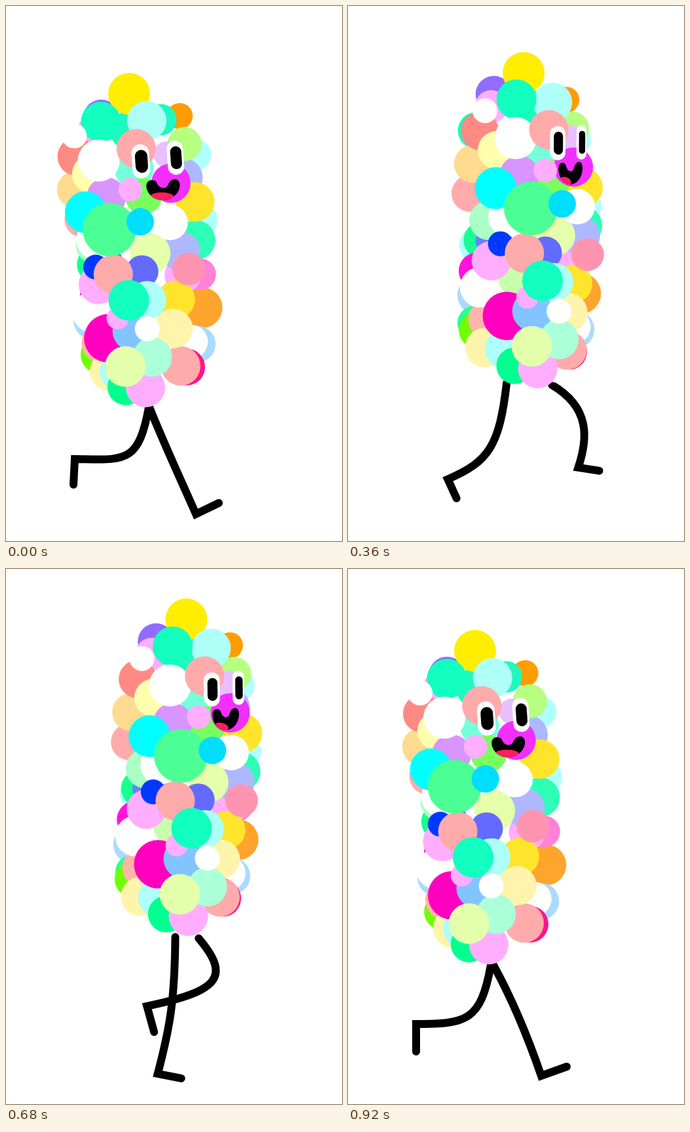
An HTML page with a canvas for the animation above (960 ms loop, 513 px wide and 816 px high).

```html
<!DOCTYPE html>
<html lang="en">
<head>
<meta charset="utf-8">
<title>Bubble walker</title>
<style>
  html, body { margin: 0; width: 100%; height: 100%; overflow: hidden; background: #fff; }
  canvas { display: block; }
</style>
</head>
<body>
<canvas id="stage" width="513" height="816"></canvas>
<script>
const ctx = document.getElementById('stage').getContext('2d');
const LOOP = 960, STEP = 40, HEIGHT = 448;

const WHITE = '#fff', YELLOW = '#ffe42c', TEAL = '#12ffbf', SALMON = '#ffabab', PINK = '#ffadff',
  ICE = '#adfff8', SKY = '#abdaff', CREAM = '#fff4ac', LIME = '#e5ffab', PERI = '#adb8ff',
  GREEN = '#00ff90', ORANGE = '#ffa42c';

// time, top x, top y, bottom x, bottom y, turn
const BODY = [
  [0, 188, 134, 213, 582, 0],
  [60, 187, 134, 216, 580, .05],
  [160, 201, 97, 235, 539, .26],
  [240, 225, 61, 258, 520, .5],
  [280, 240, 68, 270, 526, .63],
  [440, 293, 133, 306, 577, 1],
  [520, 302, 134, 308, 576, .99],
  [600, 300, 115, 300, 555, .86],
  [720, 261, 61, 266, 520, .5],
  [760, 246, 67, 250, 526, .38],
  [920, 194, 125, 215, 573, .01]
];

// time, hip, two curve handles, heel, toe
const LEG_A = [
  [0, 219, 612, 240, 665, 268, 725, 290, 775, 325, 758],
  [160, 224, 566, 228, 640, 234, 710, 241, 773, 282, 770],
  [280, 233, 552, 233, 640, 220, 690, 187, 754, 222, 769],
  [440, 254, 598, 237, 695, 220, 698, 131, 690, 125, 730],
  [600, 288, 585, 305, 650, 280, 662, 167, 662, 168, 702],
  [760, 288, 550, 360, 605, 355, 640, 263, 686, 285, 719],
  [920, 222, 604, 250, 655, 275, 715, 295, 773, 334, 759]
];
const LEG_B = [
  [0, 218, 612, 202, 700, 180, 692, 105, 691, 103, 730],
  [160, 260, 563, 305, 575, 300, 635, 186, 646, 197, 686],
  [280, 295, 550, 380, 565, 345, 610, 284, 650, 309, 683],
  [440, 318, 604, 345, 660, 370, 715, 393, 758, 430, 738],
  [600, 284, 580, 281, 650, 296, 715, 312, 780, 350, 768],
  [760, 235, 552, 238, 670, 210, 685, 155, 750, 185, 777],
  [920, 218, 604, 203, 690, 180, 694, 104, 694, 104, 736]
];

const lerp = (a, b, k) => a + (b - a) * k;

// Smooth looping interpolation through unevenly spaced keys
function pose(keys, t) {
  const n = keys.length;
  const key = i => keys[(i + n) % n];
  const time = i => key(i)[0] + Math.floor(i / n) * LOOP;
  let i = n - 1;
  while (keys[i][0] > t) i--;
  const span = time(i + 1) - time(i), k = (t - time(i)) / span;
  const slope = (j, c) => (key(j + 1)[c] - key(j - 1)[c]) / (time(j + 1) - time(j - 1)) * span;
  return keys[0].slice(1).map((_, c0) => {
    const c = c0 + 1, a = key(i)[c], b = key(i + 1)[c];
    const m = slope(i, c), e = slope(i + 1, c);
    return a + k * (m + k * (3 * (b - a) - 2 * m - e + k * (2 * (a - b) + m + e)));
  });
}

let body;

// Body coordinates to the stage; depth gives the sideways shift as the body turns
function place(x, y, depth) {
  const [tx, ty, bx, by, turn] = body, k = y / HEIGHT;
  return [lerp(tx, bx, k) + x + depth * (turn - .5), lerp(ty, by, k) + .12 * x * (turn - .5)];
}

function ball(color, x, y, depth, r = 30) {
  const [px, py] = place(x, y, depth);
  ctx.fillStyle = color;
  ctx.beginPath();
  ctx.arc(px, py, r, 0, Math.PI * 2);
  ctx.fill();
}

function drawBack() {
  ball('#b0ffff', 83, 98, -26, 24);
  ball(TEAL, -70, 90, -20, 28);
  ball(ORANGE, 80, 331, -26, 31);
  ball('#ff9d00', 68, 38, -14, 20);
  ball('#906cff', -46, 34, -3, 28);
  ball(PINK, -54, 53, 6, 25);
  ball('#22f7c0', 42, 42, -8, 24);
  ball('#22f7c0', 5, 56, 15);
  ball('#b0ffff', 89, 198, -18, 26);
  ball(PERI, 68, 132, -14);
  ball('#2effb6', 83, 228, -12);
  ball(YELLOW, 86, 170, -10);
  ball('#b0ffff', -72, 263, -36, 27);
  ball('#18ff90', -72, 256, -12, 28);
  ball('#6483ff', -55, 256, -8, 28);
  ball('#ff14dc', -77, 303, -26, 28);
  ball(SALMON, -87, 186, -12, 28);
  ball('#ff82d6', 79, 280, -28, 24);
  ball(PINK, 64, 280, -5, 28);
  ball(SKY, -82, 340, -16);
  ball('#2bff92', -80, 382, -40, 26);
  ball('#6fff00', -81, 393, -26, 28);
  ball('#ffb5a8', -69, 376, -11);
  ball(SKY, 70, 386, -25, 28);
  ball(WHITE, 64, 382, -18, 26);
  ball('#ff148a', 55, 420, -19, 28);
  ball(CREAM, -69, 419, -31);
  ball(ICE, -45, 420, -13);
  ball(GREEN, -33, 445, -6, 28);
  ball(WHITE, 28, 446, 0, 22);
}

function drawSides() {
  ball('#b6ff80', 74, 81, -12, 26);
  ball('#ffdb90', -86, 141, 6, 29);
  ball('#ff8a84', -77, 91, 17, 29);
  ball('#ffffae', -54, 119, 22, 29);
  ball('#75ffdb', 15, 115, 28);
  ball('#ffee00', 0, 0, 0, 32);
  ball('#abffc6', -64, 226, 0);
  ball(WHITE, -46, 220, 34);
  ball(WHITE, -79, 328, -9, 31);
  ball('#c8ffab', -24, 312, -5, 28);
  ball(PINK, -63, 287, 0);
  ball(SALMON, 50, 418, -11);
  ball(PINK, 0, 448, 0);
  ball(PERI, 71, 244, 12);
  ball(YELLOW, 58, 317, 8, 29);
  ball(CREAM, 49, 361, 4);
  ball('#ff94b1', 81, 272, 11, 25);
  ball('#ff00bf', -47, 370, 11, 37);
  ball('#82c4ff', -8, 361, 13, 31);
  ball('#e8bfff', 60, 96, 16, 20);
}

function drawFront() {
  ball(LIME, 29, 245, 21, 31);
  ball('#78ff5e', 28, 158, 30, 28);
  ball('#f22fff', 64, 140, 16);
  ball(WHITE, 64, 200, 25, 27);
  ball('#d894ff', -26, 156, 35);
  ball('#0038ff', -55, 261, 21, 19);
  ball('#636aff', 14, 272, 19, 25);
  ball(SALMON, -23, 274, 33);
  ball(ICE, 35, 43, 21);
  ball(TEAL, -26, 41, 39, 30.5);
  ball(WHITE, -72, 60, 30, 19);
  ball(WHITE, -31, 100, 42, 32);
  ball(SALMON, 23, 85, 34);
  ball('#00ffff', -61, 177, 30, 32);
  ball('#4cff95', -16, 206, 51, 41);
  ball(PINK, 13, 147, 39, 18);
  ball('#00deff', 32, 197, 52, 21);
  ball(ICE, 23, 316, 26, 29);
  ball(PINK, -21, 341, 31, 17);
  ball(TEAL, 1, 315, 38, 31);
  ball('#abffd9', 26, 403, 26);
  ball(WHITE, 25, 360, 35, 19);
  ball('#e4ffac', -16, 415, 26, 31);
}

function capsule(color, x, w, h) {
  ctx.fillStyle = color;
  ctx.beginPath();
  ctx.roundRect(x - w, -h, w * 2, h * 2, w);
  ctx.fill();
}

function drawEye(x, y, depth, white, pupil) {
  const turn = body[4];
  ctx.save();
  ctx.translate(...place(x, y, depth));
  ctx.rotate(lerp(-.07, .02, turn));
  capsule(WHITE, 0, white, 26);
  capsule('#000', 1, pupil, 17.5);
  ctx.restore();
}

function drawMouth() {
  const turn = body[4];
  ctx.save();
  ctx.translate(...place(56, 149.5, 25));
  ctx.scale(lerp(25.5, 17, turn), lerp(16, 17.5, turn));
  ctx.beginPath();
  ctx.moveTo(-1, -.35);
  ctx.bezierCurveTo(-1, -.98, -.6, -1.05, -.4, -.75);
  ctx.bezierCurveTo(-.25, -.02, .2, -.02, .3, -.5);
  ctx.bezierCurveTo(.45, -1.15, 1, -1.2, 1, -.45);
  ctx.bezierCurveTo(1, .4, .5, 1, -.05, 1);
  ctx.bezierCurveTo(-.6, 1, -1, .3, -1, -.35);
  ctx.fillStyle = '#000';
  ctx.fill();
  ctx.clip();
  ctx.beginPath();
  ctx.ellipse(lerp(-.08, -.5, turn), .72, lerp(.75, .45, turn), lerp(.46, .35, turn), turn * .5, 0, Math.PI * 2);
  ctx.fillStyle = '#ff1f5a';
  ctx.fill();
  ctx.restore();
}

function drawLeg(keys, t) {
  const [hx, hy, ax, ay, bx, by, heelX, heelY, toeX, toeY] = pose(keys, t);
  ctx.beginPath();
  ctx.moveTo(hx, hy);
  ctx.bezierCurveTo(ax, ay, bx, by, heelX, heelY);
  ctx.lineTo(toeX, toeY);
  ctx.strokeStyle = '#000';
  ctx.lineWidth = 12;
  ctx.lineCap = 'round';
  ctx.lineJoin = 'miter';
  ctx.stroke();
}

function draw(now) {
  const t = Math.floor(now % LOOP / STEP) * STEP;
  body = pose(BODY, t);
  const turn = body[4];
  ctx.fillStyle = WHITE;
  ctx.fillRect(0, 0, 513, 816);
  drawLeg(LEG_B, t);
  drawLeg(LEG_A, t);
  drawBack();
  drawSides();
  drawFront();
  drawEye(33, 105, 42, lerp(13.5, 11.5, turn), lerp(9.5, 6.5, turn));
  drawEye(76, 102, 22, lerp(12.5, 6.5, turn), lerp(8.5, 4, turn));
  drawMouth();
}

const start = performance.now();
function tick() {
  draw(performance.now() - start);
  requestAnimationFrame(tick);
}
tick();
</script>
</body>
</html>
```
